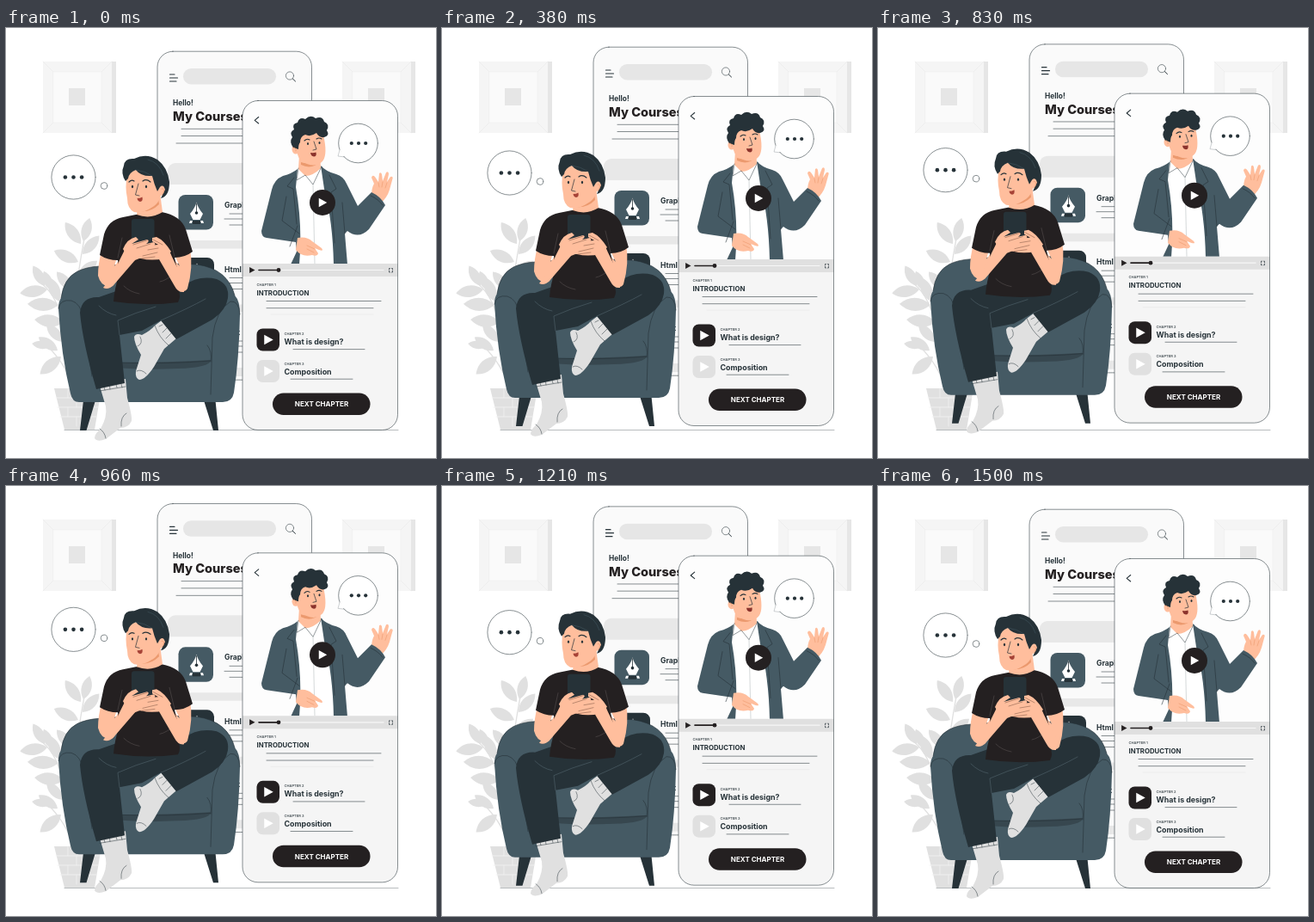
An HTML page with a canvas for the animation above (1.54 s loop, 500 by 500 pixels).

```html
<!DOCTYPE html>
<html lang="en">
<head>
<meta charset="utf-8">
<title>Online course</title>
<style>
html, body { margin: 0; width: 100%; height: 100%; overflow: hidden; background: #fff; }
canvas { display: block; width: 500px; height: 500px; }
</style>
</head>
<body>
<canvas id="stage"></canvas>
<script>
const LOOP = 1540, STEP = 1000 / 24, CYCLE = 36, PEAK = 17.5, LIFT = 10;
const INK = '#263238', SLATE = '#455a64', BLACK = '#242021', SKIN = '#ffbe9d',
      SHADE = '#eb996e', PALE = '#e0e0e0', PAPER = '#fafafa', THIN = 0.55;

const canvas = document.getElementById('stage');
const ratio = window.devicePixelRatio || 1;
canvas.width = canvas.height = 500 * ratio;
const ctx = canvas.getContext('2d');

function fill(path, color) {
  ctx.fillStyle = color;
  ctx.fill(new Path2D(path));
}
function line(path, color = INK, width = THIN) {
  ctx.strokeStyle = color;
  ctx.lineWidth = width;
  ctx.lineCap = ctx.lineJoin = 'round';
  ctx.stroke(new Path2D(path));
}
function paint(color, outline) {
  if (color) { ctx.fillStyle = color; ctx.fill(); }
  if (outline) { ctx.strokeStyle = outline; ctx.lineWidth = THIN; ctx.stroke(); }
}
function box(x, y, w, h, r, color, outline) {
  ctx.beginPath();
  ctx.roundRect(x, y, w, h, r);
  paint(color, outline);
}
function oval(x, y, rx, ry, color, turn = 0, outline) {
  ctx.beginPath();
  ctx.ellipse(x, y, rx, ry, turn, 0, 7);
  paint(color, outline);
}
const disc = (x, y, r, color, outline) => oval(x, y, r, r, color, 0, outline);
function text(words, x, y, size, weight = 700, align = 'left', color = INK) {
  ctx.font = `${weight} ${size}px Inter, sans-serif`;
  ctx.textAlign = align;
  ctx.fillStyle = color;
  ctx.fillText(words, x, y);
}
const rule = (x1, x2, y, color = INK) => line(`M${x1} ${y}H${x2}`, color);

function pictureFrame(x) {
  ctx.save();
  ctx.translate(x, 39);
  box(0, 0, 85, 83, 0, '#e6e6e6');
  box(0, 0, 80, 83, 0, '#f5f5f5');
  line('M0 0L12 12M80 0L68 12M0 83L12 71M80 83L68 71', '#e9e9e9', 0.6);
  box(12, 12, 56, 59, 0, PAPER, '#ececec');
  box(30, 31, 19, 20, 0, '#e6e6e6');
  ctx.restore();
}

function leaf(x, y, length, degrees) {
  ctx.save();
  ctx.translate(x, y);
  ctx.rotate(degrees * Math.PI / 180);
  const l = length, w = length * 0.28;
  fill(`M0 0C${l * .3} ${-w} ${l * .7} ${-w} ${l} 0C${l * .7} ${w} ${l * .3} ${w} 0 0Z`, PALE);
  ctx.restore();
}

function plant() {
  line('M84 420C72 370 80 300 93 235M80 420C72 345 60 310 40 296M80 420C70 395 60 380 40 362', PALE, 1.3);
  [[90, 248, 28, -75], [87, 251, 31, -126], [89, 263, 29, -48], [84, 272, 31, -155],
   [84, 288, 28, -38], [77, 305, 28, -130], [62, 318, 30, -112], [53, 305, 24, -112],
   [45, 300, 27, -120], [48, 304, 32, 172], [61, 322, 36, 182], [67, 342, 34, 185],
   [60, 375, 27, 215], [52, 370, 22, 188], [66, 365, 28, 228], [64, 382, 32, 140]]
    .forEach(l => leaf(...l));
  fill('M56 419H111L103 467H68Z', PALE);
  line('M58 430H109M60 441H107M63 452H105M72 419V430M91 419V430M82 430V441M100 430V441M72 441V452M91 441V452M82 452V463', '#f2f2f2', 0.8);
}

function room() {
  pictureFrame(43);
  pictureFrame(391);
  plant();
  rule(68, 456, 467.5, '#7d8589');
}

function courseRow(y, label) {
  box(188, y, 155, 65, 0, PAPER);
  text(label, 254, y + 27, 8.6);
  rule(260, 330, y + 34);
  rule(254, 330, y + 40);
  rule(260, 322, y + 47);
}

function coursePhone() {
  box(176, 27.2, 179.5, 382, 18, PAPER, INK);
  line('M190.5 54H196M190.5 58H199.5M190.5 62H198', INK, 1.2);
  box(206, 47, 108, 18.5, 9.2, '#e6e6e6');
  disc(330, 55.5, 4.6, null, INK);
  line('M333.4 59L336.5 62', INK, 1);
  text('Hello!', 194, 90.2, 8.4);
  text('My Courses', 194, 108, 14.6, 800, 'left', BLACK);
  rule(204, 330, 117.3);
  rule(204, 330, 125.5);
  rule(198, 322, 134);
  box(188, 157, 155, 248, 9, '#e8e8e8');
  courseRow(182, 'Graphic');
  courseRow(256.5, 'Html');
  courseRow(330, 'Test');

  box(200.5, 194, 40.5, 40.5, 8, SLATE);
  fill('M221.5 202.5Q223 209 229 216L225.5 223H217.5L214 216Q220 209 221.5 202.5Z', '#fff');
  line('M221.5 204V214', INK, 0.8);
  disc(221.5, 215, 1.8, INK);
  fill('M217 224H226V228H217Z', INK);
  fill('M214 224H217L216 227H213ZM226 224H229L230 227H227Z', '#fff');
  box(200.5, 267, 41.5, 41, 8, INK);
  fill('M222 273.5L225 279.5H223.5L222 276.5L220.5 279.5H219Z', '#fff');
}

function dots(x, y, gap, r) {
  for (let i = -1; i < 2; i++) disc(x + i * gap, y, r, INK);
}

function presenter() {
  ctx.save();
  ctx.beginPath();
  ctx.rect(276, 86, 179, 188);
  ctx.clip();

  // raised hand
  fill('M425 195Q425 186 428 181L425 174Q426 170 429 173L433 179L434 169Q436 167 437 170L438 178L442 168Q445 166 445 170L443 179L447 173Q451 172 449 177L446 188Q443 198 435 204Z', SKIN);
  line('M433 180L434 185M438 179L437 185M443 180L441 186', SHADE, 0.6);

  // shirt and neck
  fill('M340 164L368 162L383 190L384 275H337Z', '#fff');
  fill('M341 148L365 143L366 163Q357 172 348 172L340 164Z', SKIN);
  fill('M343 156Q354 160 365 151V156Q355 165 343 159Z', SHADE);
  line('M340 163L338 177L348 171L357 182L367 161L371 176', INK, 0.5);
  line('M357 181L359 274', '#a9b0b3', 0.5);

  // jacket
  fill('M339 164Q333 169 322 172Q312 176 309 188L297 236Q297 243 303 244L337 249L338 260L331 275H341Q345 230 337 185Z', SLATE);
  fill('M366 160Q372 167 384 170Q393 173 396 181L409 207L425 191Q436 196 441 206L422 234Q410 246 397 236L394 239L397 275H381Q380 225 370 187Z', SLATE);
  line('M326 196L321 224L341 239M335 174L327 184L334 187L338 228M376 171L384 187L378 191L382 250M391 203L394 239M424 195Q433 199 438 206M330 254L339 230', INK, 0.6);

  // resting hand
  fill('M339 244Q350 242 356 248L367 256Q370 260 364 258L359 256L363 262Q362 266 356 264Q344 267 337 258Z', SKIN);
  line('M350 253L359 257M350 257L358 261', SHADE, 0.6);

  // head
  fill('M338 124Q340 116 353 116Q368 116 370 129Q374 150 367 156Q360 162 350 158Q341 155 339 147Z', SKIN);
  oval(337, 141, 4.5, 5.5, SKIN);
  fill('M334 139Q329 132 333 127Q329 121 335 118Q332 111 339 110Q341 103 348 106Q354 100 360 105Q368 102 370 109Q377 112 373 119Q377 125 370 127Q364 128 361 122Q354 127 348 124Q342 126 342 133Q340 135 340 141Z', INK);
  line('M347 131Q350 128 353 130M361 129Q364 127 367 129', INK, 1.1);
  oval(351, 134.5, 1, 1.5, INK);
  oval(364.5, 133.5, 1, 1.5, INK);
  line('M358 132L361 141L357 142', INK, 0.7);
  fill('M354 145Q358 145.5 360.5 144.5Q361.5 149.5 358 149.5Q354.5 149 354 145Z', '#8b332c');
  line('M335 139Q338 140 337 143', SHADE, 0.7);
  ctx.restore();
}

function playMark(x, y, size, color) {
  fill(`M${x - size * .45} ${y - size * .55}L${x + size * .55} ${y}L${x - size * .45} ${y + size * .55}Z`, color);
}

function chapter(number, title, iconY, titleY, color, lineStart, lineEnd) {
  box(291.5, iconY, 26.5, 26, 7, color);
  playMark(305, iconY + 13, 10.5, '#fff');
  text('CHAPTER ' + number, 323.5, titleY - 11, 4.1, 500);
  text(title, 323.5, titleY, 8.9);
  rule(lineStart, lineEnd, titleY + 5.6);
}

function videoPhone() {
  box(275, 84.5, 180.5, 383, 18, '#f5f5f5');
  box(275, 84.5, 180.5, 190, [18, 18, 0, 0], '#fdfdfd');
  line('M293.7 103.5L289.2 107.3L293.7 111', INK, 1.1);
  presenter();
  disc(409.5, 134, 22.8, '#fff', INK);
  fill('M388 141L385.5 149L394 149Z', '#fff');
  line('M388 142L386 149L394 150', '#9aa1a4', 0.5);
  dots(410, 134, 8.2, 2.1);
  disc(368, 203, 15, BLACK);
  playMark(368, 203, 9.5, '#fff');

  box(275, 274, 180.5, 15, 0, PALE);
  playMark(286, 281.5, 6.4, BLACK);
  line('M317 281.5H439', '#f7f7f7', 1.2);
  line('M294 281.5H317', BLACK, 1.6);
  disc(317, 281.5, 2.4, BLACK);
  line('M445.5 281V279.5H446.5M448.5 279.5H449.5V281M449.5 282.5V284H448.5M446.5 284H445.5V282.5', INK, 0.7);

  text('CHAPTER 1', 291.5, 299.8, 4.1, 500);
  text('INTRODUCTION', 291.5, 310.8, 7.8);
  rule(303, 436, 317.5);
  rule(303, 427, 325.7);
  rule(308, 427, 333, '#e4e4e4');
  chapter(2, 'What is design?', 349.5, 368, BLACK, 334, 417);
  chapter(3, 'Composition', 386, 402.6, PALE, 331, 403);
  box(310, 424.5, 113.5, 25.5, 12.7, BLACK);
  text('NEXT CHAPTER', 367, 440.4, 8, 700, 'center', '#fff');
  box(275, 84.5, 180.5, 383, 18, null, INK);
}

function armchair() {
  fill('M90 433H104L93.5 468H86ZM230 433H243.5L247 468H241Z', INK);
  fill('M61 326Q61 318 64 314Q67 291 83 283Q93 278 108 277Q160 272 222 275Q258 280 266 311Q272 317 272 333Q271 385 265 424Q263 435 252 435H85Q77 435 75 425Q64 380 61 326Z', SLATE);
  line('M61 326Q63 315 76 317Q87 320 90 338L100 405M64 314Q67 291 83 283Q93 278 108 277Q160 272 222 275Q258 280 266 311M238 426L240 360Q244 328 261 318Q271 317 272 333M238 388Q240 376 234 369', INK, 0.6);
  fill('M130 389Q190 389 239 386Q236 395 200 396Q160 398 130 395Z', '#37474f');
  line('M130 389Q190 391 238 387', INK, 0.6);
}

function socks() {
  fill('M108 413L139 408L141 430Q147 452 146 457Q142 465 133 465L116 478Q106 482 103 477Q103 472 110 466Q118 452 116 440Z', PALE);
  line('M109 422L139 417M113 414L115 421M120 413L121 420M127 411L129 418M133 410L135 418M140 448Q133 452 134 463M109 466Q115 470 116 477', INK, 0.5);
  fill('M181 340L198 361L184 373L172 394Q162 409 155 409Q150 407 151 399L157 380Q149 367 149 359Q151 354 158 357Q168 352 173 346Z', PALE);
  line('M173 346Q178 360 189 369M178 347L182 345M182 354L187 349M186 361L192 355M156 359Q160 367 153 370M152 399Q157 396 163 402', INK, 0.5);
}

function learner() {
  socks();
  // trousers
  fill('M128 306L206 300Q224 287 245 292Q260 298 258 314Q256 328 240 339L198 362L180 340L158 352L132 357L138 413L105 420Q89 365 86 331Q88 312 108 313Z', INK);
  line('M128 334Q117 332 108 323M132 357L130 340Q150 331 174 324M180 340Q212 326 232 315', '#52656e', 0.6);

  // arms behind the shirt
  fill('M111 260Q107 274 107 288Q111 303 124 300Q135 286 150 269L137 257Q131 272 126 277L130 263Z', SKIN);
  fill('M214 256Q218 278 211 303Q207 309 198 304L178 269L189 257Q197 273 202 277L195 262Z', SKIN);

  // shirt and neck
  fill('M151 217L181 214Q203 218 209 234L217 260Q208 267 196 267L199 280L200 303Q204 312 200 319Q163 324 125 318Q126 304 132 284L130 270Q118 270 109 264L114 240Q119 223 136 220Z', BLACK);
  fill('M154 202L179 192L182 214Q168 223 152 217Z', SKIN);
  fill('M155 211Q171 210 177 198L178 205Q168 215 155 213Z', SHADE);
  line('M130 267L135 244M196 266L190 241M137 300Q144 307 155 309M199 283Q186 294 179 295', '#56504f', 0.6);
  fill('M132 270Q126 287 113 302Q119 305 125 299L150 270L138 258Z', SKIN);
  fill('M189 257Q197 276 207 292L207 307Q200 308 196 300L178 269Z', SKIN);

  // phone and hands
  box(146, 222, 26.5, 33, 3, INK);
  fill('M136 257Q141 245 151 243L154 246L146 251L164 246Q168 247 163 251L172 249Q176 252 169 255L174 256Q174 260 166 261Q168 268 155 268L145 272Z', SKIN);
  fill('M192 260Q184 247 175 243L170 244L170 248L177 252L164 253Q158 256 165 258L155 261Q153 265 159 265L157 268Q169 271 184 268Z', SKIN);
  line('M148 252L164 247M152 256L168 251M165 258L177 256M159 265L176 261M158 268L173 266M171 246L182 252', '#75503f', 0.5);

  // head
  fill('M141 171Q154 158 174 169L181 185Q181 203 169 209Q159 216 149 214Q141 210 141 198Q138 185 141 171Z', SKIN);
  oval(182, 188, 5, 7, SKIN, 0.2);
  fill('M139 178Q133 169 137 160Q138 151 149 152Q163 145 176 153Q188 162 190 179Q190 196 180 198L185 188Q183 181 179 185L176 190Q172 181 170 172Q157 173 151 165Q143 168 142 175Z', INK);
  line('M143 179Q146 176 149 178M159 178Q163 175 168 179', INK, 1.2);
  oval(147, 184.5, 1.1, 1.7, INK);
  oval(163, 184.5, 1.1, 1.7, INK);
  line('M154 181L150.5 194L155 195', INK, 0.7);
  fill('M152.5 198Q156 198 158.5 196.5Q159.5 201.5 156 202Q153 201.5 152.5 198Z', '#a74337');
  line('M181 187Q185 186 183 192', SHADE, 0.7);
  line('M151 165Q161 166 170 172M165 153Q178 156 183 171', SLATE, 0.5);
}

function thought() {
  disc(78.5, 173.5, 25.6, '#fff', INK);
  dots(78.5, 173.5, 9.6, 2.3);
  disc(114, 183.5, 3.8, '#fff', INK);
}

function lift(ms) {
  const step = Math.floor((ms % LOOP + 4) / STEP);
  const away = Math.abs(step - PEAK);
  return LIFT * Math.abs(1 - away / (CYCLE / 2));
}

function draw() {
  ctx.setTransform(ratio, 0, 0, ratio, 0, 0);
  ctx.fillStyle = '#fff';
  ctx.fillRect(0, 0, 500, 500);
  room();
  ctx.translate(0, lift(0) - lift(performance.now()));
  coursePhone();
  videoPhone();
  armchair();
  learner();
  thought();
  requestAnimationFrame(draw);
}
draw();
</script>
</body>
</html>
```
